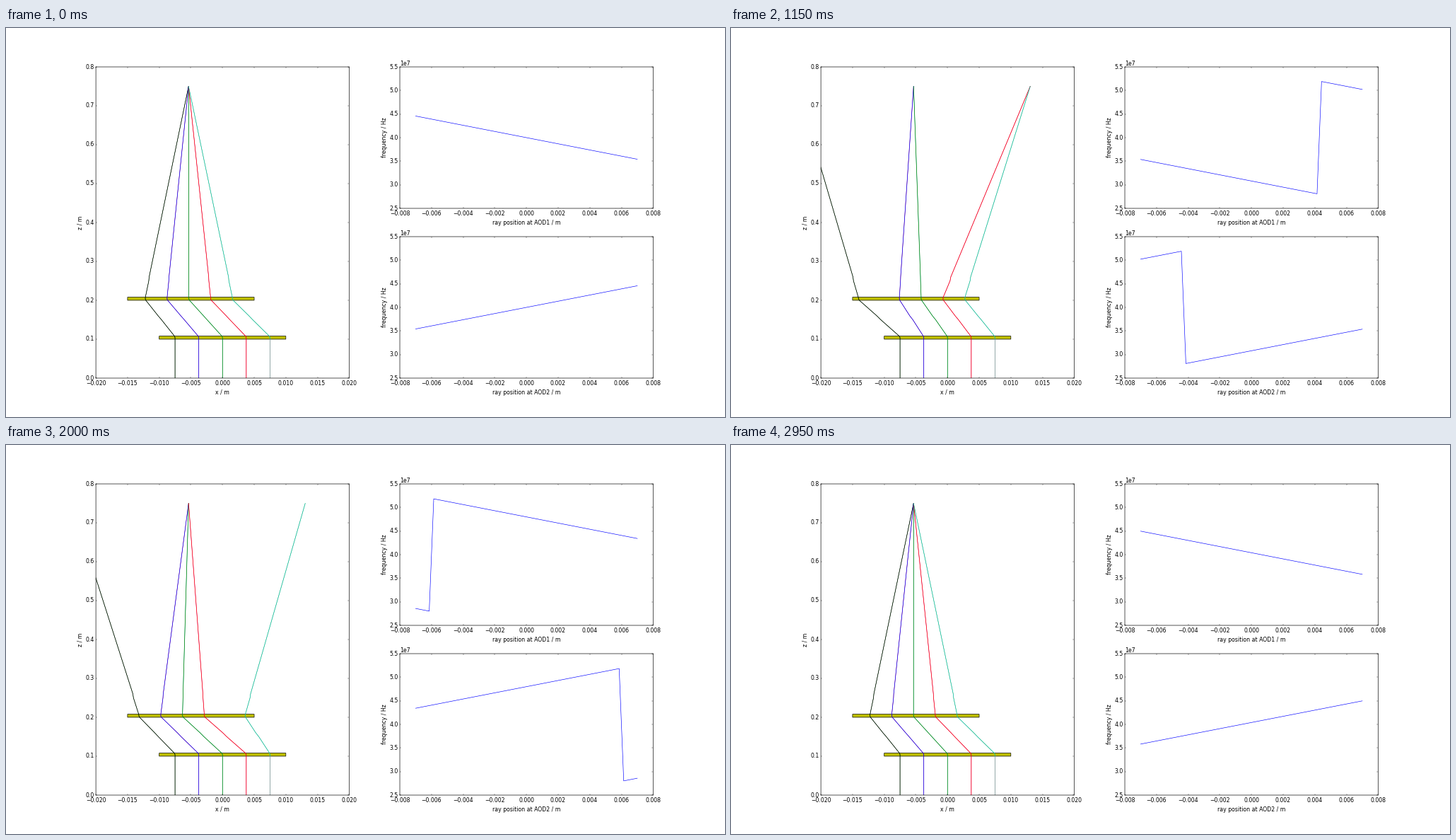
A matplotlib script for the animation above (3000 ms loop, 1017 by 550 pixels).

```python
import numpy as np
import matplotlib.pyplot as plt
from matplotlib.animation import FuncAnimation
from matplotlib.patches import Rectangle

FRAMES, INTERVAL = 60, 50
DPI = 48

plt.style.use("classic")
plt.rcParams.update({
    "font.family": "DejaVu Sans",
    "font.size": 11.6,
    "figure.facecolor": "white",
    "savefig.dpi": "figure",
    "axes.linewidth": 1.0,
    "xtick.major.size": 3.6, "ytick.major.size": 3.6,
    "xtick.major.pad": 4.0, "ytick.major.pad": 3.6,
})

# Frequencies in MHz, lengths in metres
F_LOW, F_SPAN, F_MID = 28, 24, 40
CHIRP = 654               # MHz per metre of aperture
SWEEP = F_SPAN / FRAMES   # MHz per frame
DEFLECT = 0.00139         # slope per MHz
INDEX = 2.2               # refraction in crystals and plates
AOD1_Z, AOD2_Z, AOD2_X, THICK = 0.1, 0.2, -0.005, 0.008
PLATE = 0.01
FOCUS_X, FOCUS_Z, FOCUS_STEP = -0.00536, 0.75, 0.01842

ray_x = np.linspace(-0.0075, 0.0075, 5)
plot_x = np.linspace(-0.007, 0.007, 50)
# Each crystal deflects at its middle
ray_z = np.array([0, AOD1_Z, AOD1_Z + THICK / 2, AOD1_Z + THICK,
                  0.15, 0.15 + PLATE,
                  AOD2_Z, AOD2_Z + THICK / 2, AOD2_Z + THICK,
                  0.25, 0.25 + PLATE, FOCUS_Z])


def wrap(f):
    """Fold a frequency into the sweep band; also give the number of turns."""
    turns = np.floor((f - F_LOW) / F_SPAN + 1e-9)
    return f - turns * F_SPAN, turns


def trace(x, mid):
    """Positions of one ray at every height in ray_z."""
    f1, turns1 = wrap(mid + CHIRP * x)
    slope, nominal = -DEFLECT * f1, -DEFLECT * F_MID
    flat = slope / INDEX
    tilted = nominal + (slope - nominal) / INDEX   # plate faces the mean beam
    dz = np.diff(ray_z)
    low = x + np.cumsum(dz[2:7] * [flat, slope, tilted, slope, flat])

    turns2 = wrap(mid - CHIRP * (low[3] - AOD2_X))[1]
    target = FOCUS_X + FOCUS_STEP * (turns1 - turns2)
    weight = dz[7:] * [1 / INDEX, 1, 1 / INDEX, 1]
    high = low[-1] + np.cumsum(weight) / weight.sum() * (target - low[-1])
    return np.concatenate([[x, x, x], low, high])


fig = plt.figure(figsize=(1017 / DPI, 550 / DPI), dpi=DPI)
fig.subplots_adjust(left=0.125, right=0.9, bottom=0.1, top=0.9,
                    wspace=0.2, hspace=0.2)


def add_axes(cols, spot, xlim, ylim, xlabel, ylabel):
    a = fig.add_subplot(cols, 2, spot)
    a.set(xlim=xlim, ylim=ylim)
    a.set_xlabel(xlabel, labelpad=6.2)
    a.set_ylabel(ylabel, labelpad=3.6)
    for spine in a.spines.values():
        spine.set_snap(False)
    return a


def freq_curve(spot, name):
    a = add_axes(2, spot, (-0.008, 0.008), (2.5e7, 5.5e7),
                 f"ray position at {name} / m", "frequency / Hz")
    return a.plot([], [], color="b", linewidth=0.95)[0]


ax = add_axes(1, 1, (-0.02, 0.02), (0, 0.8), "x / m", "z / m")
for cx, z in ((0, AOD1_Z), (AOD2_X, AOD2_Z)):
    ax.add_patch(Rectangle((cx - 0.01, z), 0.02, THICK, snap=False,
                           facecolor="y", edgecolor="k", linewidth=1.0))

# Two coincident bundles: a thin one below, the main one on top
rays = [ax.plot([], [], color=c, linewidth=w)[0]
        for colors, w in (("grcmy", 0.6), ("kbgrc", 1.1)) for c in colors]
curve1 = freq_curve(2, "AOD1")
curve2 = freq_curve(4, "AOD2")
ax.plot([ray_x[-1]] * 2, [0, AOD1_Z], color=(0.48, 0.58, 0.58), linewidth=1.2)


def update(n):
    mid = F_MID - SWEEP * n
    paths = [trace(x, mid) for x in ray_x]
    for i, line in enumerate(rays):
        first = 1 if i % 5 == 4 else 0
        line.set_data(paths[i % 5][first:], ray_z[first:])
    curve1.set_data(plot_x, wrap(mid - CHIRP * plot_x)[0] * 1e6)
    curve2.set_data(plot_x, wrap(mid + CHIRP * plot_x)[0] * 1e6)
    return rays + [curve1, curve2]


anim = FuncAnimation(fig, update, frames=FRAMES, interval=INTERVAL,
                     init_func=lambda: update(0), repeat=True, repeat_delay=0)
plt.show()
```
